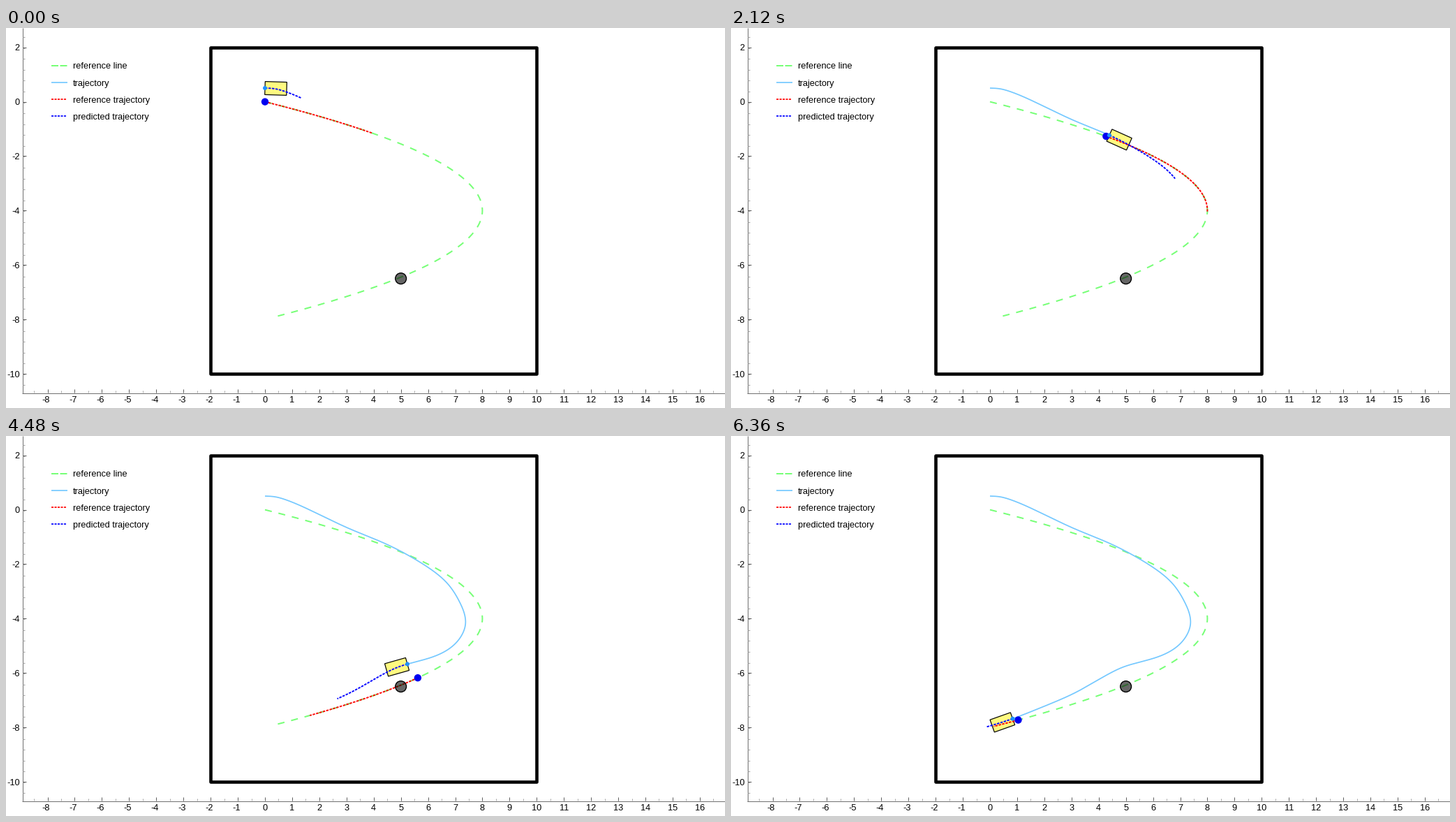
These frames come from a looping animation (1030x544 px, 6.4 s). A matplotlib script:

```python
import numpy as np
import matplotlib
import matplotlib.pyplot as plt
from matplotlib.animation import FuncAnimation
from matplotlib.patches import Circle, Polygon, Rectangle

matplotlib.rcParams["font.family"] = "Liberation Sans"

W, H, DPI = 1030, 544, 100
FRAMES, STEP_MS = 160, 40
PX = 72 / DPI
X0, Y0, UNIT = 371.0, 105.6, 38.93
HORIZON = 24       # frames covered by the predicted line
REF_POINTS = 13    # waypoints covered by the red line
GREEN, SKY, RED, BLUE = "#77ff77", "#73c8ff", "#ff0000", "#0000ff"


def to_px(x, y):
    return X0 + UNIT * np.asarray(x), Y0 - UNIT * np.asarray(y)


def dashes(on, off, width):
    return (0, (on / width, off / width))


DOTS = dashes(3.1, 1.4, 1.7)


def spline(t, v, tq):
    """Natural cubic spline through (t, v), sampled at tq."""
    n, h = len(t), np.diff(t)
    a, b = np.eye(n), np.zeros(n)
    for i in range(1, n - 1):
        a[i, i - 1:i + 2] = h[i - 1], 2 * (h[i - 1] + h[i]), h[i]
        b[i] = 6 * ((v[i + 1] - v[i]) / h[i] - (v[i] - v[i - 1]) / h[i - 1])
    m = np.linalg.solve(a, b)
    k = np.clip(np.searchsorted(t, tq) - 1, 0, n - 2)
    p, q = t[k + 1] - tq, tq - t[k]
    return ((m[k] * p**3 + m[k + 1] * q**3) / (6 * h[k])
            + (v[k] / h[k] - m[k] * h[k] / 6) * p
            + (v[k + 1] / h[k] - m[k + 1] * h[k] / 6) * q)


def arc_length(x, y):
    return np.concatenate([[0], np.cumsum(np.hypot(np.diff(x), np.diff(y)))])


# Reference parabola x = 8 - (y + 4)^2 / 2
ref_y = np.linspace(0, -8, 2401)
ref_x = 8 - (ref_y + 4)**2 / 2
ref_s = arc_length(ref_x, ref_y)
ref_px, ref_py = to_px(ref_x, ref_y)
way_s = np.interp(np.arange(54), [0, 14, 19, 25, 27, 35, 40, 53],
                  [0, 4.46, 5.98, 8.51, 9.34, 12.67, 14.36, 18.46])

# Driven path of the car, in pixels
knots = np.array([
    (371, 86), (385, 87), (400, 91), (424, 100.7), (452, 114), (495, 134),
    (542, 153.5), (573, 169), (603, 187), (634, 213), (650, 238),
    (657.5, 258), (658.3, 268), (654.5, 282), (639.5, 301), (612, 316),
    (575, 326.5), (562, 330.7), (545, 338.5), (515, 355.5), (490, 369),
    (460, 382.3), (430, 394.5), (403.5, 404.7), (385, 410.8), (366.5, 416.3)])
chord = arc_length(*knots.T)
fine = np.linspace(0, chord[-1], 4000)
path_x, path_y = (spline(chord, c, fine) for c in knots.T)
path_s = arc_length(path_x, path_y)

# Distance travelled: speed profile, pinned to the path at a few times
times = np.arange(0, FRAMES + HORIZON, 0.25)
speed = np.interp(times, [0, 25, 53, 136, 159, 183], [0, 4.55, 4.6, 4.8, 2.2, 1.05])
dist = np.concatenate([[0], np.cumsum((speed[1:] + speed[:-1]) / 8)])
pin_t = [0, 31, 53, 87, 112, 126, 159, 183]
pin_s = np.interp(chord[[0, 4, 6, 11, 16, 19, 23, 25]], fine, path_s)
dist = np.interp(dist, np.interp(pin_t, times, dist), pin_s)


def travelled(t):
    return np.interp(t, times, dist)


def on_path(s):
    return np.interp(s, path_s, path_x), np.interp(s, path_s, path_y)


fig = plt.figure(figsize=(W / DPI, H / DPI), dpi=DPI, facecolor="white")
ax = fig.add_axes([0, 0, 1, 1])
ax.set_xlim(0, W)
ax.set_ylim(H, 0)
ax.axis("off")


def line(x, y, color, width, style="-", z=3):
    return ax.plot(x, y, color=color, lw=width * PX, ls=style, zorder=z,
                   dash_capstyle="butt", solid_capstyle="butt")[0]


def label(x, y, text, ha="left"):
    ax.text(x, y, text, fontsize=12.7 * PX, ha=ha, va="baseline", color="black")


def draw_axes():
    line([23.5, 23.5], [0, 522.5], "#707070", 1)
    line([23, W], [522.5, 522.5], "#707070", 1)
    for v in np.arange(-10.4, 2.7, 0.4):
        y = round(float(to_px(0, v)[1])) + 0.5
        line([24, 27], [y, y], "#a8a8a8", 1)
    for v in np.arange(-8.5, 17, 0.5):
        x = round(float(to_px(v, 0)[0])) - 0.5
        line([x, x], [519, 522], "#a8a8a8", 1)
    for v in range(-10, 3, 2):
        y = float(to_px(0, v)[1])
        line([24, 29], [round(y) - 0.5] * 2, "#606060", 1)
        label(19.5, y + 4.6, str(v), "right")
    for v in range(-8, 17):
        x = float(to_px(v, 0)[0])
        line([round(x) - 0.5] * 2, [517, 522], "#606060", 1)
        label(x - (2 if v < 0 else 0), 536, str(v), "center")


def draw_legend():
    rows = [("reference line", GREEN, 2, dashes(10, 2.5, 2)),
            ("trajectory", SKY, 1.7, "-"),
            ("reference trajectory", RED, 1.7, DOTS),
            ("predicted trajectory", BLUE, 1.7, DOTS)]
    for i, (text, color, width, style) in enumerate(rows):
        y = 53.5 + 24.3 * i
        line([65, 88 if i < 2 else 86], [y, y], color, width, style)
        label(95.5, y + 5, text)


draw_axes()
draw_legend()
left, top = to_px(-2, 2)
ax.add_patch(Rectangle((left, top), 12 * UNIT, 12 * UNIT, fill=False, ec="black",
                       lw=4.6 * PX, joinstyle="round", zorder=2))
shown = ref_y >= -7.883
line(ref_px[shown], ref_py[shown], GREEN, 2, dashes(10, 9.85, 2), 3)
ax.add_patch(Circle(to_px(5, -6.5), 7.9, fc=(0, 0, 0, 0.6), ec="black",
                    lw=1.4 * PX, zorder=8))

car = ax.add_patch(Polygon(np.zeros((4, 2)), fc="#fffa80", ec="black",
                           lw=1.2 * PX, zorder=4))
trail = line([], [], SKY, 1.7, z=5)
red = line([], [], RED, 1.9, DOTS, 6)
pred = line([], [], BLUE, 1.9, DOTS, 7)
nearest = ax.add_patch(Circle((0, 0), 5.2, fc="#0000f0", ec="none", zorder=9))
rear = ax.add_patch(Circle((0, 0), 3, fc="#1e90ff", ec="none", zorder=10))


def update(i):
    s = travelled(i)
    x, y = on_path(s)
    x2, y2 = on_path(s + 2)
    x1, y1 = on_path(max(s - 2, 0))
    d = np.array([x2 - x1, y2 - y1]) / np.hypot(x2 - x1, y2 - y1)
    n = np.array([-d[1], d[0]])
    back, front = np.array([x, y]), np.array([x, y]) + 31.1 * d
    car.set_xy([back - 9.4 * n, front - 9.4 * n, front + 9.4 * n, back + 9.4 * n])
    rear.center = (x, y)

    past = path_s < s
    trail.set_data(np.append(path_x[past], x), np.append(path_y[past], y))

    # the plan swings wide before it starts to avoid the obstacle
    w = np.linspace(0, 1, 50)
    fx, fy = on_path(travelled(i + HORIZON * w))
    swing = max(0, np.cos((i - 87) / 18 * np.pi / 2)) if abs(i - 87) < 18 else 0
    pred.set_data(fx + 16 * swing * w**3, fy + 22 * swing * w**3)

    # last waypoint passed by the car
    here = ref_s[np.argmin((ref_px - x)**2 + (ref_py - y)**2)]
    k = max(np.searchsorted(way_s, here + 0.01) - 1, 0)
    a, b = way_s[k], way_s[min(k + REF_POINTS, 53)]
    part = (ref_s >= a) & (ref_s <= b)
    red.set_data(ref_px[part], ref_py[part])
    nearest.center = (np.interp(a, ref_s, ref_px), np.interp(a, ref_s, ref_py))
    return car, trail, red, pred, nearest, rear


anim = FuncAnimation(fig, update, frames=FRAMES, interval=STEP_MS,
                     repeat=True, repeat_delay=0, blit=False)
plt.show()
```
